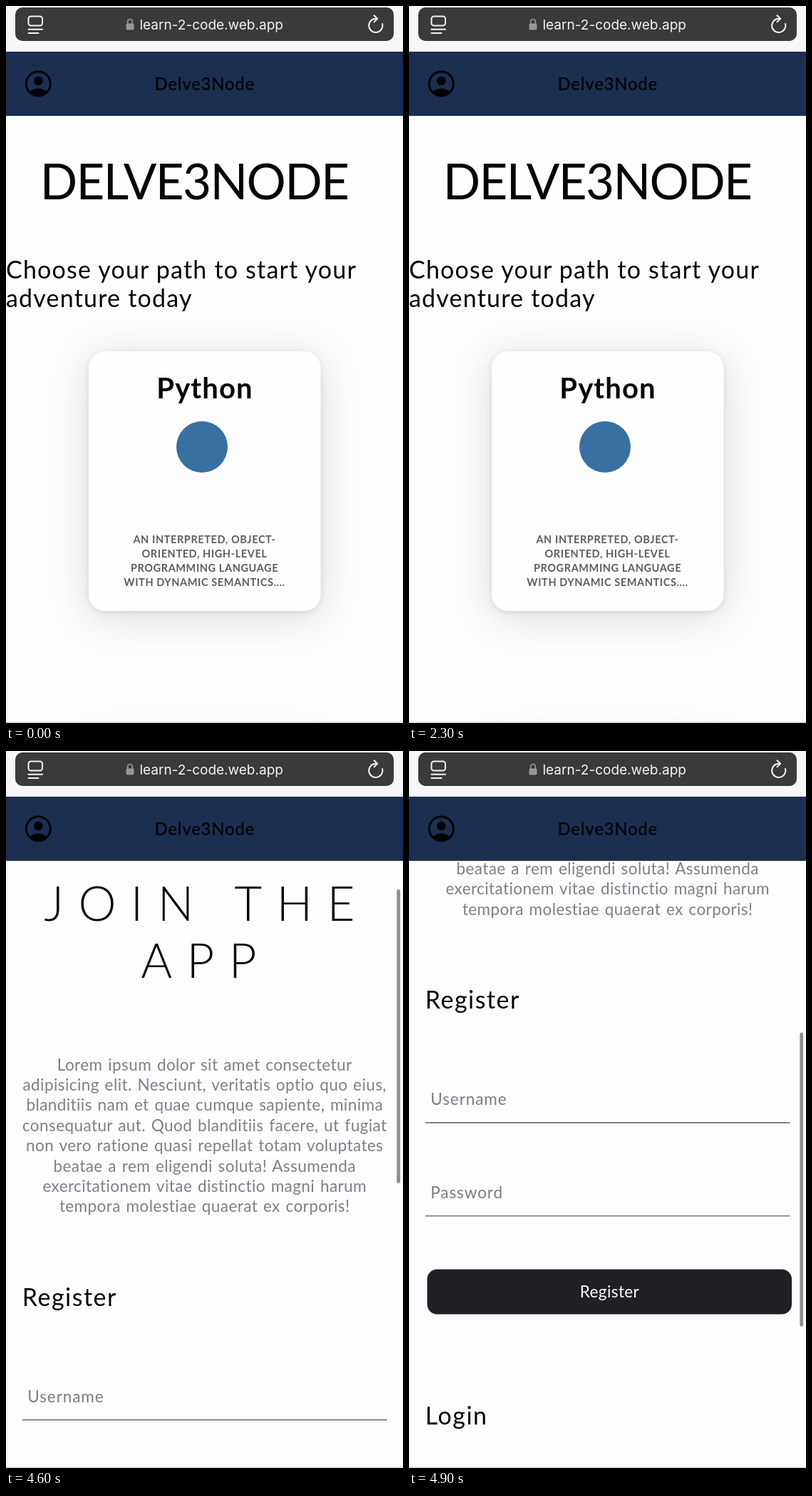
Write an HTML page that moves like this. It is 557x1005 px and loops after 5 s.

```html
<!DOCTYPE html>
<html lang="en">
<head>
<meta charset="utf-8">
<title>Course app walkthrough</title>
<style>
  @property --scroll { syntax: "<number>"; inherits: true; initial-value: 0; }

  html, body { margin: 0; width: 100%; height: 100%; overflow: hidden; background: #fdfcff; }
  svg { display: block; width: 100vw; height: 100vh; animation: scroll 5s step-end infinite; }
  text { font-family: Lato, "Open Sans", sans-serif; fill: #050507; }
  .mid { text-anchor: middle; }

  .home { animation: home 5s step-end infinite; }
  .join { animation: join 5s step-end infinite; }
  .content { transform: translateY(calc(var(--scroll) * -1px)); }
  .bar { fill: #8f8e91; transform: translateY(calc(var(--scroll) * .482px)); animation: bar 5s step-end infinite; }

  .card { fill: #fffeff; filter: drop-shadow(0 2px 5px rgba(0,0,0,.1)) drop-shadow(0 8px 28px rgba(0,0,0,.13)); }
  .url { font: 19px Inter, "Liberation Sans", sans-serif; fill: #f4f4f5; }
  .brand { font-size: 24px; font-weight: 600; letter-spacing: .7px; }
  .hero { font-size: 69px; letter-spacing: -1.6px; }
  .lead { font-size: 34px; letter-spacing: 1.2px; }
  .course { font-size: 40px; font-weight: 700; letter-spacing: 1.1px; }
  .blurb { font-size: 14.5px; font-weight: 700; letter-spacing: .6px; fill: #5d5c60; }
  .banner { font-size: 67px; font-weight: 300; letter-spacing: 20.4px; }
  .lorem { font-size: 22.5px; letter-spacing: .42px; word-spacing: 1.6px; fill: #817f84; }
  .heading { font-size: 34px; letter-spacing: 1.5px; }
  .field { font-size: 22.5px; letter-spacing: .9px; fill: #7d7c80; }
  .button { font-size: 22.5px; letter-spacing: .4px; fill: #fff; }
  .rule { stroke: #858488; stroke-width: 1.8; }
  .icon { fill: none; stroke: #f4f4f5; stroke-width: 2; stroke-linecap: round; stroke-linejoin: round; }

  @keyframes home { 0% { visibility: visible } 50%, 100% { visibility: hidden } }
  @keyframes join { 0% { visibility: hidden } 50%, 100% { visibility: visible } }
  @keyframes bar { 0% { opacity: 0 } 90% { opacity: .6 } 92%, 100% { opacity: 1 } }
  @keyframes scroll {
    0% { --scroll: 0 }
    90% { --scroll: 14 }
    92% { --scroll: 73.5 }
    94% { --scroll: 222 }
    96% { --scroll: 369.5 }
    98%, 100% { --scroll: 490 }
  }
</style>
</head>
<body>
<svg viewBox="0 0 557 1005">
  <defs>
    <clipPath id="face"><circle cx="45.3" cy="109" r="16"/></clipPath>
  </defs>
  <rect width="557" height="1005" fill="#fdfcff"/>

  <g class="home">
    <text class="hero mid" x="264" y="271">DELVE3NODE</text>
    <g class="lead">
      <text x="0" y="382">Choose your path to start your</text>
      <text x="0" y="422">adventure today</text>
    </g>
    <rect class="card" x="116" y="484" width="325.5" height="364" rx="23"/>
    <rect class="card" x="116" y="1028" width="325.5" height="364" rx="23"/>
    <text class="course mid" x="279" y="550">Python</text>
    <circle cx="275" cy="618" r="36" fill="#3870a2"/>
    <g class="mid">
      <text class="blurb" x="278.5" y="753">AN INTERPRETED, OBJECT-</text>
      <text class="blurb" x="278.5" y="773">ORIENTED, HIGH-LEVEL</text>
      <text class="blurb" x="278.5" y="793">PROGRAMMING LANGUAGE</text>
      <text class="blurb" x="278.5" y="813">WITH DYNAMIC SEMANTICS....</text>
    </g>
  </g>

  <g class="join">
    <g class="content">
      <g class="mid">
        <text class="banner" x="281.5" y="311">JOIN THE</text>
        <text class="banner" x="280.5" y="391.5">APP</text>
      </g>
      <g class="mid" id="lorem"></g>
      <text class="heading" x="22.8" y="851">Register</text>
      <text class="field" x="30.3" y="986">Username</text>
      <path class="rule" d="M23 1011H534.5"/>
      <text class="field" x="30.3" y="1117">Password</text>
      <path class="rule" d="M23 1141.7H534.5"/>
      <rect x="25.5" y="1216.5" width="511.5" height="63" rx="14" fill="#1f2124"/>
      <text class="button mid" x="281.5" y="1256">Register</text>
      <text class="heading" x="22.8" y="1434">Login</text>
    </g>
    <rect class="bar" x="548.3" y="158.6" width="4.8" height="412" rx="2.4"/>
  </g>

  <rect width="557" height="64" fill="#f7f6f9"/>
  <rect x="13" y="2" width="531" height="47" rx="10" fill="#3a393b"/>
  <g class="icon">
    <rect x="31.5" y="14.5" width="19.5" height="13" rx="3.5"/>
    <path d="M31.5 32.8H51M31.5 38H45.5"/>
    <path d="M519 17.8a9.6 9.6 0 1 0 9 7.2M516.5 13.2l4.6 4.6l-4.6 4.6"/>
  </g>
  <rect x="168.5" y="24.5" width="11" height="9" rx="1.8" fill="#98979a"/>
  <path d="M170.7 25v-3.2a3.3 3.3 0 0 1 6.6 0V25" fill="none" stroke="#98979a" stroke-width="1.7"/>
  <text class="url" x="187.5" y="33">learn-2-code.web.app</text>

  <rect y="64" width="557" height="90" fill="#1d2f50"/>
  <circle cx="45.3" cy="109" r="17" fill="none" stroke="#020306" stroke-width="3"/>
  <g clip-path="url(#face)" fill="#020306">
    <circle cx="45.3" cy="105" r="6.3"/>
    <ellipse cx="45.3" cy="125" rx="13.5" ry="9.5"/>
  </g>
  <text class="brand mid" x="278.8" y="117.5">Delve3Node</text>
  <rect y="1003.3" width="557" height="1.7" fill="#d8d7da"/>
</svg>
<script>
  const lines = [
    "Lorem ipsum dolor sit amet consectetur",
    "adipisicing elit. Nesciunt, veritatis optio quo eius,",
    "blanditiis nam et quae cumque sapiente, minima",
    "consequatur aut. Quod blanditiis facere, ut fugiat",
    "non vero ratione quasi repellat totam voluptates",
    "beatae a rem eligendi soluta! Assumenda",
    "exercitationem vitae distinctio magni harum",
    "tempora molestiae quaerat ex corporis!"
  ];
  document.getElementById("lorem").innerHTML = lines
    .map((line, i) => `<text class="lorem" x="278.7" y="${521 + i * 28.4}">${line}</text>`)
    .join("");
</script>
</body>
</html>
```
